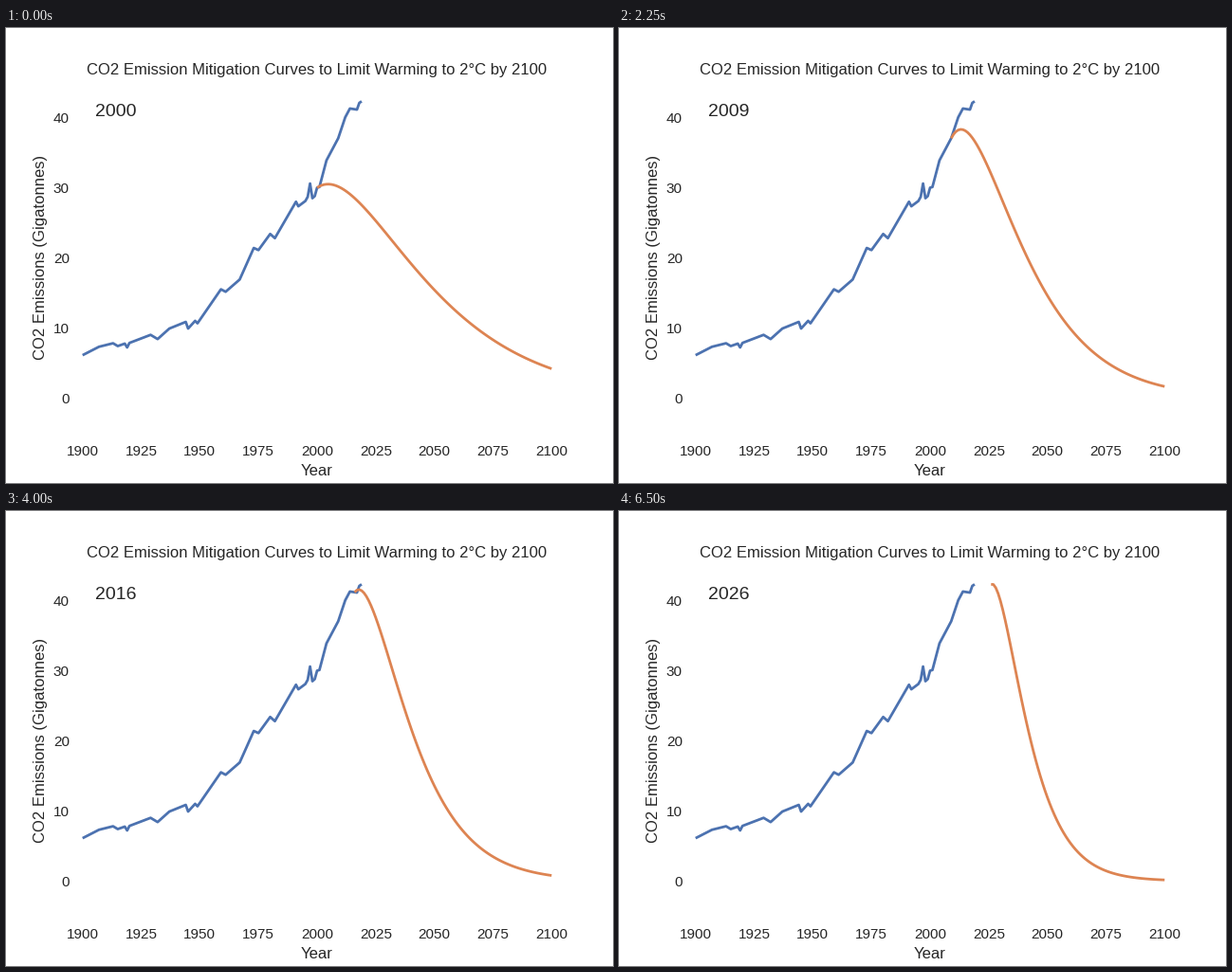
Recreate the animation shown at these times as a matplotlib script. Size 640 by 480 pixels, loop 6.75 s.

```python
import numpy as np
import matplotlib.pyplot as plt
from matplotlib.animation import FuncAnimation

INK, BLUE, ORANGE = "#262626", "#4C72B0", "#DD8452"
FIRST_YEAR, LAST_YEAR = 1900, 2019
START, END = 2000, 2100
QUOTA_YEAR, QUOTA = 2018, 1147.0  # gigatonnes left at the start of that year
FIT_POINTS = 6

# Turning points of the yearly emissions, in gigatonnes
TURNS = {
    1900: 6.1, 1907: 7.3, 1913: 7.8, 1915: 7.4, 1918: 7.75, 1919: 7.2,
    1920: 7.85, 1929: 9.0, 1932: 8.4, 1937: 9.9, 1944: 10.85, 1945: 9.9,
    1948: 11.0, 1949: 10.65, 1959: 15.5, 1961: 15.15, 1967: 16.9,
    1973: 21.4, 1975: 21.1, 1980: 23.4, 1982: 22.8, 1991: 28.0,
    1992: 27.35, 1995: 28.1, 1996: 28.7, 1997: 30.6, 1998: 28.5,
    1999: 28.8, 2000: 30.0, 2001: 30.1, 2004: 33.9, 2009: 37.05,
    2012: 40.05, 2014: 41.3, 2017: 41.15, 2018: 42.1, 2019: 42.33,
}
YEARS = np.arange(FIRST_YEAR, LAST_YEAR + 1)
EMISSIONS = np.interp(YEARS, list(TURNS), list(TURNS.values()))


def emission(year):
    return EMISSIONS[min(year, LAST_YEAR) - FIRST_YEAR]


def growth_rate(year):
    """Exponential growth over the latest recorded years."""
    stop = min(year, LAST_YEAR) - FIRST_YEAR + 1
    recent = EMISSIONS[stop - FIT_POINTS:stop]
    return np.polyfit(np.arange(FIT_POINTS), np.log(recent), 1)[0]


def remaining_quota(year):
    if year <= QUOTA_YEAR:
        return QUOTA + sum(emission(y) for y in range(year, QUOTA_YEAR))
    return QUOTA - sum(emission(y) for y in range(QUOTA_YEAR, year))


def mitigation_curve(year):
    """Smooth decline whose total equals the remaining quota."""
    level, rate = emission(year), growth_rate(year)
    span = remaining_quota(year) / level
    decay = (1 + np.sqrt(1 + rate * span)) / span
    t = np.arange(END - year + 1)
    return year + t, level * (1 + (rate + decay) * t) * np.exp(-decay * t)


plt.rcParams.update({
    "font.family": "Liberation Sans",
    "text.color": INK,
    "axes.labelcolor": INK,
    "xtick.color": INK,
    "ytick.color": INK,
    "lines.linewidth": 2,
    "lines.solid_capstyle": "butt",
})

fig, ax = plt.subplots(figsize=(6.4, 4.8), dpi=100)
ax.set(xlim=(FIRST_YEAR - 0.3, END + 0.3), ylim=(-5, 45),
       xticks=range(FIRST_YEAR, END + 1, 25), yticks=range(0, 41, 10))
ax.set_title("CO2 Emission Mitigation Curves to Limit Warming to 2°C by 2100",
             fontsize=12)
ax.set_xlabel("Year", fontsize=12)
ax.set_ylabel("CO2 Emissions (Gigatonnes)", fontsize=12)
ax.tick_params(labelsize=11, length=6, bottom=False, left=False)
ax.spines[:].set_visible(False)

ax.plot(YEARS, EMISSIONS, color=BLUE)
curve, = ax.plot([], [], color=ORANGE)
year_label = ax.text(0.0285, 0.9055, "", transform=ax.transAxes, fontsize=14)


def update(i):
    year = START + i
    curve.set_data(*mitigation_curve(year))
    year_label.set_text(str(year))
    return curve, year_label


anim = FuncAnimation(fig, update, frames=27, interval=250, repeat=True)
plt.show()
```
